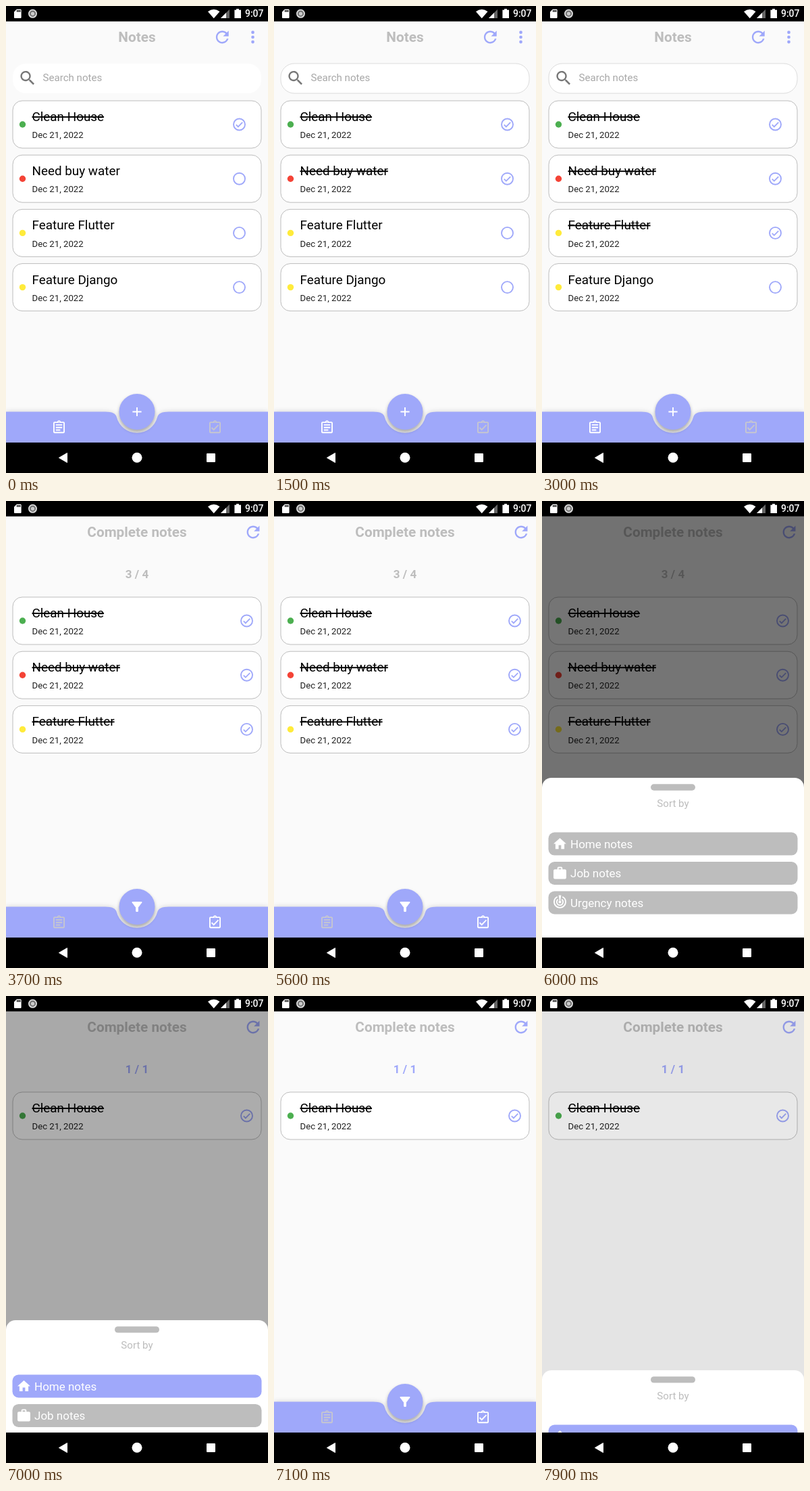
Animation, 388 px wide and 690 px high, one loop 8000 ms. Source, as an HTML page:

```html
<!DOCTYPE html>
<html lang="en">
<head>
<meta charset="utf-8">
<title>Notes app</title>
<style>
html, body { margin: 0; width: 100%; height: 100%; overflow: hidden; background: #000; }
svg { display: block; width: 388px; height: 690px; font-family: Roboto, "Open Sans", sans-serif; }
.bold { font-weight: 700; }
.done { text-decoration: line-through; }
.bar { filter: drop-shadow(0 -1px 3px rgba(0, 0, 0, .12)); }
.fab { filter: drop-shadow(0 3px 2.5px rgba(0, 0, 0, .32)); }
</style>
</head>
<body>
<svg id="stage" viewBox="0 0 388 690"></svg>
<script>
const LOOP = 8000, STEP = 100;
const BLUE = '#9fa8fa', GREY = '#bdbdbd', FADED = '#c6c6d0';
const TOP = 22.5, BOTTOM = 645, SHEET = 236;
const ICON = 22.66, BIG = 28.3;

const notes = [
  { title: 'Clean House', color: '#4caf50', doneAt: 0 },
  { title: 'Need buy water', color: '#f44336', doneAt: 1500 },
  { title: 'Feature Flutter', color: '#ffeb3b', doneAt: 2200 },
  { title: 'Feature Django', color: '#ffeb3b', doneAt: Infinity }
];
const COMPLETE_AT = 3400, FILTER_AT = 6900;
const sheets = [{ open: 5630, close: 6870 }, { open: 7865, close: Infinity }];

// Icon paths on a 24 unit grid
const board = 'M19 3h-4.18C14.4 1.84 13.3 1 12 1s-2.4.84-2.82 2H5c-1.1 0-2 .9-2 2v14c0 1.1.9 2 2 2h14c1.1 0 2-.9 2-2V5c0-1.1-.9-2-2-2zm-7-.25a.75.75 0 1 1 0 1.5a.75.75 0 0 1 0-1.5zM19 19H5V5h14z';
const icons = {
  refresh: 'M17.65 6.35C16.2 4.9 14.21 4 12 4c-4.42 0-7.99 3.58-7.99 8s3.57 8 7.99 8c3.73 0 6.84-2.55 7.73-6h-2.08c-.82 2.33-3.04 4-5.65 4-3.31 0-6-2.69-6-6s2.69-6 6-6c1.66 0 3.14.69 4.22 1.78L13 11h7V4z',
  more: [6, 12, 18].map(y => `M10 ${y}a2 2 0 1 0 4 0a2 2 0 1 0-4 0z`).join(''),
  search: 'M15.5 14h-.79l-.28-.27A6.5 6.5 0 1 0 13.73 14.43l.27.28v.79l5 4.99L20.49 19zm-6 0a4.5 4.5 0 1 1 0-9a4.5 4.5 0 0 1 0 9z',
  add: 'M19 13h-6v6h-2v-6H5v-2h6V5h2v6h6z',
  filter: 'M4.25 5.61C6.27 8.2 10 13 10 13v6c0 .55.45 1 1 1h2c.55 0 1-.45 1-1v-6s3.72-4.8 5.74-7.39c.51-.66.04-1.61-.79-1.61H5.04c-.83 0-1.3.95-.79 1.61z',
  list: board + 'M7 7h10v2H7zM7 11h10v2H7zM7 15h7v2H7z',
  tick: board + 'M18 9l-1.41-1.42L10 14.17l-2.59-2.58L6 13l4 4z',
  home: 'M10 20v-6h4v6h5v-8h3L12 3 2 12h3v8z',
  work: 'M20 6h-4V4c0-1.1-.9-2-2-2h-4c-1.1 0-2 .9-2 2v2H4c-1.1 0-2 .9-2 2v11c0 1.1.9 2 2 2h16c1.1 0 2-.9 2-2V8c0-1.1-.9-2-2-2zm-6 0h-4V4h4z',
  sd: 'M18 2h-8L4 8v12c0 1.1.9 2 2 2h12c1.1 0 2-.9 2-2V4c0-1.1-.9-2-2-2zm-6 6h-2V4h2zm3 0h-2V4h2zm3 0h-2V4h2z'
};

const place = (cx, cy, size, inner) =>
  `<g transform="translate(${cx - size / 2} ${cy - size / 2}) scale(${size / 24})">${inner}</g>`;
const icon = (name, cx, cy, size, fill) =>
  place(cx, cy, size, `<path d="${icons[name]}" fill="${fill}" fill-rule="evenodd"/>`);
const text = (str, x, y, size, fill, attrs = '') =>
  `<text x="${x}" y="${y}" font-size="${size}" fill="${fill}" ${attrs}>${str}</text>`;
const centred = (str, y, size, fill, cls = '') =>
  text(str, 194, y, size, fill, `text-anchor="middle" class="${cls}"`);
const rect = (x, y, w, h, r, fill, attrs = '') =>
  `<rect x="${x}" y="${y}" width="${w}" height="${h}" rx="${r}" fill="${fill}" ${attrs}/>`;
const circle = (x, y, r, fill, attrs = '') =>
  `<circle cx="${x}" cy="${y}" r="${r}" fill="${fill}" ${attrs}/>`;
const path = (d, fill, attrs = '') => `<path d="${d}" fill="${fill}" ${attrs}/>`;

const clamp = v => Math.min(1, Math.max(0, v));

function bezier(x1, y1, x2, y2) {
  const at = (a, b, u) => 3 * a * u * (1 - u) ** 2 + 3 * b * u * u * (1 - u) + u ** 3;
  return x => {
    let lo = 0, hi = 1;
    for (let i = 0; i < 24; i++) {
      const mid = (lo + hi) / 2;
      if (at(x1, x2, mid) < x) lo = mid; else hi = mid;
    }
    return at(y1, y2, hi);
  };
}
const slide = bezier(0, 0, .2, 1), ease = bezier(.25, .1, .25, 1);

function card(note, y, checkX, done) {
  const cy = y + 35;
  const mark = done ? '<path d="M7 12.4l3.2 3.2L17 8.8" stroke-width="1.9"/>' : '';
  return rect(10, y, 368, 70, 14, '#fff', `stroke="${GREY}"`) +
    circle(24.5, cy, 4.7, note.color) +
    text(note.title, 38.5, y + 30, 18.88, '#000', done ? 'class="done"' : '') +
    text('Dec 21, 2022', 38.5, y + 55.2, 13.2, '#222') +
    place(checkX, cy, ICON, `<g fill="none" stroke="${BLUE}" stroke-width="2"><circle cx="12" cy="12" r="9"/>${mark}</g>`);
}

const cards = (list, y, checkX, t) =>
  list.map((n, i) => card(n, y + i * 80.2, checkX, t >= n.doneAt)).join('');

function notesPage(t) {
  const border = `stroke="#dcdcdc" stroke-opacity="${clamp(t / 400)}"`;
  return centred('Notes', 53, 20.76, GREY, 'bold') +
    icon('refresh', 320.3, 46, BIG, BLUE) + icon('more', 365.5, 46, BIG, BLUE) +
    rect(10, 85, 368, 44, 20, '#fff', border) +
    icon('search', 32, 106.5, BIG, '#777') +
    text('Search notes', 54.5, 111.3, 15.1, '#a8a8a8') +
    cards(notes, 140, 345.5, t);
}

function completePage(t, filtered) {
  const done = notes.filter(n => t >= n.doneAt);
  const count = filtered ? '1 / 1' : `${done.length} / ${notes.length}`;
  return centred('Complete notes', 53, 20.76, GREY, 'bold') +
    icon('refresh', 366, 46, BIG, BLUE) +
    centred(count, 114, 17, filtered ? BLUE : GREY, 'bold') +
    cards(filtered ? done.slice(0, 1) : done, 142, 356.5, t);
}

function tabBar(complete) {
  return path('M0 599.5H147Q162 599.5 163.8 607.3A31.2 31.2 0 0 0 224.2 607.3Q226 599.5 241 599.5H388V645H0z', BLUE, 'class="bar"') +
    circle(194, 599.5, 26.5, BLUE, 'class="fab"') +
    icon(complete ? 'filter' : 'add', 194, 599.5, ICON, '#fff') +
    icon('list', 78.5, 622.7, ICON, complete ? FADED : '#fff') +
    icon('tick', 309.5, 622.7, ICON, complete ? '#fff' : FADED);
}

const urgency = (cx, cy) => place(cx, cy, ICON,
  `<g fill="none" stroke="#fff" stroke-width="2"><path d="M8 3.9a9 9 0 1 0 8 0M9 8a5 5 0 1 0 6 0"/></g>` +
  circle(12, 12, 2.2, '#fff') + path('M10 1.5h4l-1.2 8h-1.6z', '#fff'));

function sortSheet(amount, filtered) {
  const y = BOTTOM - SHEET * slide(amount);
  const rows = ['Home notes', 'Job notes', 'Urgency notes'].map((label, i) => {
    const top = y + 80.6 + i * 43.4, mid = top + 17;
    const glyph = i < 2 ? icon(['home', 'work'][i], 26.5, mid, ICON, '#fff') : urgency(26.5, mid - 1);
    return rect(9.5, top, 369, 34, 9, filtered && !i ? BLUE : GREY) + glyph + text(label, 42, mid + 6.2, 17, '#fff');
  });
  return rect(0, TOP, 388, BOTTOM - TOP, 0, '#000', `opacity="${.54 * ease(amount)}"`) +
    rect(0, y, 388, 300, 14, '#fff') +
    rect(161, y + 9.3, 66, 9.4, 4.7, GREY) +
    centred('Sort by', y + 42.6, 15.1, GREY) + rows.join('');
}

const systemBars =
  rect(0, 0, 388, TOP, 0, '#000') + rect(0, BOTTOM, 388, 45, 0, '#000') +
  icon('sd', 17.3, 11.3, 16, '#fff') +
  circle(39.5, 11.3, 5.6, '#777', 'stroke="#ddd" stroke-width="1.8"') + circle(39.5, 11.3, 2.6, '#ccc') +
  path('M299 8.2Q307.7 1.8 316.5 8.2L307.7 18.3z', '#fff') +
  path('M331 5V18H318z', '#666') + path('M326 10V18H318z', '#fff') +
  path('M341 4.2h4v1.5h3V18h-9.6V5.7h2.6z', '#fff') +
  text('9:07', 354, 16.4, 13.9, '#fff', 'font-weight="500"') +
  path('M78.5 667.5L90.5 660.5V674.5z', '#fff', 'stroke="#fff" stroke-linejoin="round"') +
  circle(194, 667.3, 7.5, '#fff') + rect(297, 661, 13, 13, 1, '#fff');

function render(t) {
  const complete = t >= COMPLETE_AT, filtered = t >= FILTER_AT;
  const sheet = sheets.find(s => t >= s.open && t < s.close + 200);
  const amount = sheet ? Math.min(clamp((t - sheet.open) / 250), 1 - clamp((t - sheet.close) / 200)) : 0;
  return rect(0, TOP, 388, BOTTOM - TOP, 0, '#fafafa') +
    (complete ? completePage(t, filtered) : notesPage(t)) + tabBar(complete) +
    (amount > 0 ? sortSheet(amount, filtered) : '') + systemBars;
}

const stage = document.getElementById('stage');
const start = performance.now();
let shown = -1;
function tick() {
  const t = Math.floor((performance.now() - start) % LOOP / STEP) * STEP;
  if (t !== shown) stage.innerHTML = render(shown = t);
  requestAnimationFrame(tick);
}
tick();
</script>
</body>
</html>
```
